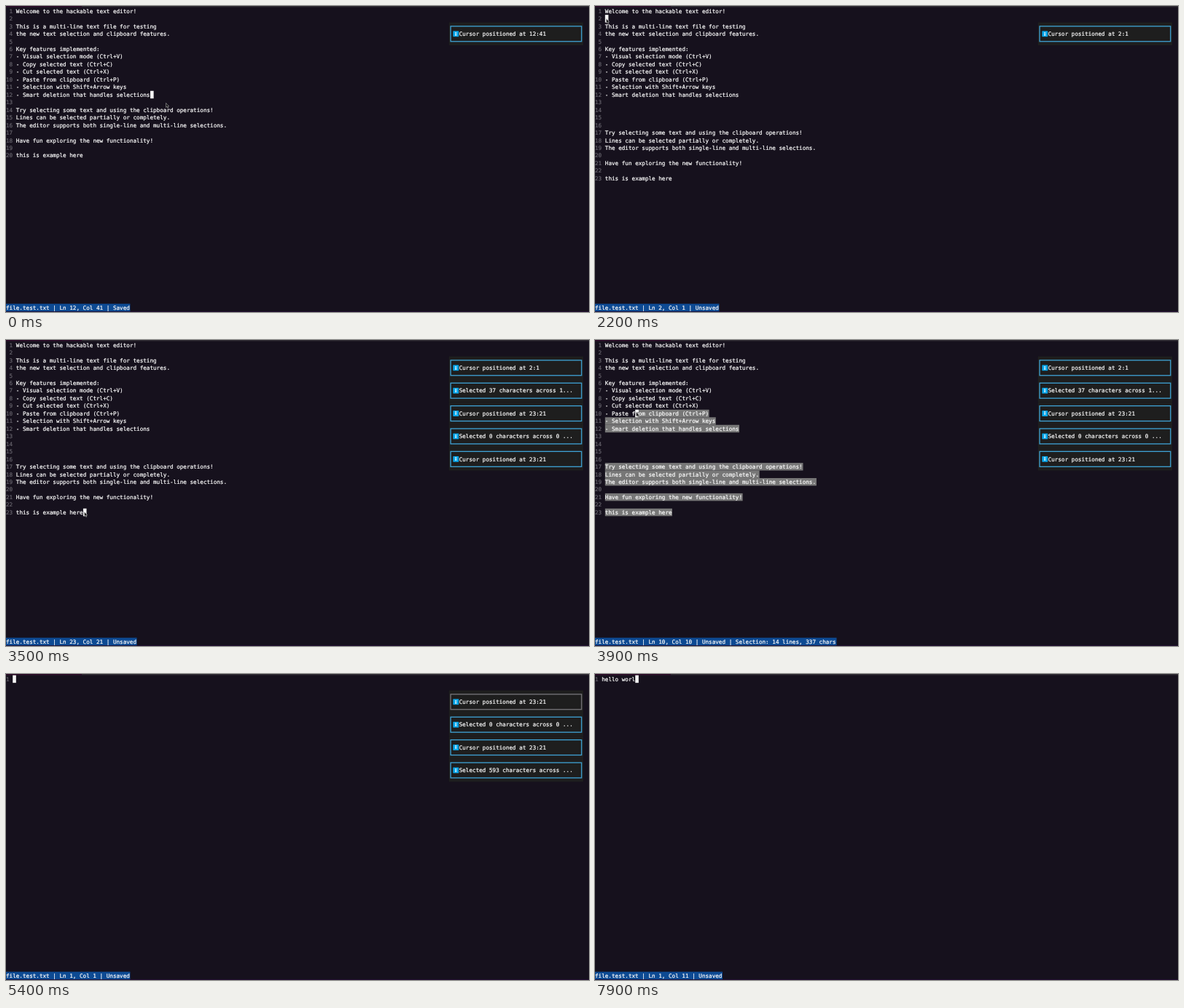
Recreate the animation shown at these times as an HTML page. Size 800 px wide and 421 px high, loop 8 s.

```html
<!DOCTYPE html>
<html lang="en">
<head>
<meta charset="utf-8">
<title>Text editor</title>
<style>
  html, body { margin: 0; width: 100%; height: 100%; overflow: hidden; background: #16111d; }
  svg { display: block; }
  text {
    font: 7.649px "DejaVu Sans Mono", monospace; white-space: pre;
    text-rendering: geometricPrecision; font-variant-ligatures: none;
    fill: #fafafa; stroke: #fafafa; stroke-width: .22px;
  }
  text.num { fill: #64616a; stroke: #64616a; }
  text.under { fill: #16111d; stroke: #16111d; }
  text.icon { font: bold 6.5px "DejaVu Sans", sans-serif; text-anchor: middle; }
  .sel { fill: #777; }
  .cur { fill: #f6f6f6; }
  .bar { fill: #0d4a93; }
  .box { fill: #1e1e1e; }
  .badge { fill: #0aa8ec; }
  .frame { fill: none; stroke: #3fa3d6; stroke-width: 1.3px; }
  .frame.old { stroke: #77757a; }
</style>
</head>
<body>
<svg width="800" height="421" viewBox="0 0 800 421">
  <rect width="800" height="421" fill="#16111d"/>
  <rect width="800" height="1.5" fill="#302d34"/>
  <rect width="104" height="1.5" fill="#2b0826"/>
  <rect y="420" width="800" height="1" fill="#231033"/>
  <g id="scene"></g>
  <path id="pointer" d="M.5 .5V6.4L1.8 5.2L2.8 7.5L3.8 7.1L2.8 4.9H4.6Z" fill="#111" stroke="#c4c4c4" stroke-width=".5"/>
</svg>
<script>
const LOOP = 8000, STEP = 100, CW = 4.605, RH = 10.46, TOP = 1.7, BASE = 8;
const FILE = `Welcome to the hackable text editor!

This is a multi-line text file for testing
the new text selection and clipboard features.

Key features implemented:
- Visual selection mode (Ctrl+V)
- Copy selected text (Ctrl+C)
- Cut selected text (Ctrl+X)
- Paste from clipboard (Ctrl+P)
- Selection with Shift+Arrow keys
- Smart deletion that handles selections

Try selecting some text and using the clipboard operations!
Lines can be selected partially or completely.
The editor supports both single-line and multi-line selections.

Have fun exploring the new functionality!

this is example here`.split("\n");

const ENTERS = [600, 800, 1000];
const DELETE = 5000;
const TYPED = "hello worl";
const KEYS = [6800, 6900, 7000, 7100, 7200, 7300, 7500, 7600, 7700, 7900];

// mouse drags: press and release time
const DRAGS = [[2200, 2500], [3000, 4400]];
// pointer path: time, x, y
const PATH = [[0, 219, 133], [1700, 219, 133], [2100, 15, 17], [2200, 15, 17], [2400, 15, 6],
  [2600, 15, 6], [2900, 121, 244], [3000, 107, 236], [3500, 107, 236], [3900, 56.5, 99], [4300, 15, 6]];
const POINTER_SHOWN = [[0, 600], [1700, 4500]];

const LIFE = 2500;
const TOASTS = [
  [-600, "Cursor positioned at 12:41"],
  [2200, "Cursor positioned at 2:1"],
  [2600, "Selected 37 characters across 1..."],
  [3000, "Cursor positioned at 23:21"],
  [3300, "Selected 0 characters across 0 ..."],
  [3500, "Cursor positioned at 23:21"],
  [4500, "Selected 593 characters across ..."]
];

const scene = document.getElementById("scene");
const pointer = document.getElementById("pointer");
const past = (times, t) => times.filter(x => x <= t).length;

function add(tag, cls, attrs, text = "") {
  const e = document.createElementNS("http://www.w3.org/2000/svg", tag);
  if (cls) e.setAttribute("class", cls);
  for (const k in attrs) e.setAttribute(k, attrs[k]);
  e.textContent = text;
  scene.append(e);
}

// drawing on the character grid
const fill = (cls, col, row, w, h = 1) =>
  add("rect", cls, { x: col * CW, y: TOP + row * RH, width: w * CW, height: h * RH });
const write = (cls, col, row, text) =>
  add("text", cls, { x: col * CW, y: TOP + row * RH + BASE }, text);

function pointerAt(t) {
  const i = PATH.findIndex(p => p[0] > t);
  if (i < 0) return PATH[PATH.length - 1].slice(1);
  const [t0, x0, y0] = PATH[i - 1], [t1, x1, y1] = PATH[i];
  const k = (t - t0) / (t1 - t0);
  return [x0 + (x1 - x0) * k, y0 + (y1 - y0) * k];
}

// zero-based line and column under the pointer
function cellAt(t, lines) {
  const [x, y] = pointerAt(t);
  const ln = Math.max(0, Math.min(lines.length - 1, Math.floor((y - TOP) / RH)));
  const col = Math.floor(x / CW) - 3;
  return [ln, Math.max(0, Math.min(lines[ln].length, col))];
}

function editorAt(t) {
  if (t >= DELETE) {
    const n = past(KEYS, t);
    return { lines: [TYPED.slice(0, n)], cur: [0, n], acted: n ? KEYS[n - 1] : DELETE };
  }
  const n = past(ENTERS, t);
  const lines = [...FILE.slice(0, 12), ...Array(n).fill(""), ...FILE.slice(12)];
  const drag = DRAGS.filter(d => d[0] <= t).pop();
  if (!drag) return { lines, cur: n ? [11 + n, 0] : [11, 40], acted: n ? ENTERS[n - 1] : 0 };
  return { lines, cur: cellAt(Math.min(t, drag[1]), lines), anchor: cellAt(drag[0], lines), acted: t };
}

function selection({ lines, cur, anchor }) {
  if (!anchor) return null;
  const [a, b] = [cur, anchor].sort((p, q) => p[0] - q[0] || p[1] - q[1]);
  const offset = ([ln, col]) => lines.slice(0, ln).reduce((s, l) => s + l.length + 1, col);
  const chars = offset(b) - offset(a);
  return chars ? { a, b, chars, count: b[0] - a[0] + 1 } : null;
}

function drawLine(text, i, digits, sel) {
  if (sel && i >= sel.a[0] && i <= sel.b[0]) {
    const from = i === sel.a[0] ? sel.a[1] : 0;
    const to = i === sel.b[0] ? sel.b[1] : text.length;
    fill("sel", digits + 1 + from, i, to - from);
  }
  write("num", 0, i, String(i + 1).padStart(digits));
  write("", digits + 1, i, text);
}

function drawCursor([ln, col], lines, digits) {
  fill("cur", digits + 1 + col, ln, 1);
  write("under", digits + 1 + col, ln, lines[ln][col] || "");
}

function drawToast([start, text], i, t) {
  const row = 2 + 3 * i, x = 132 * CW, y = TOP + row * RH;
  fill("box", 132, row, 40, 3);
  add("rect", start + LIFE - t <= STEP ? "frame old" : "frame",
    { x: x + CW / 2, y: y + RH / 2, width: 39 * CW, height: 2 * RH });
  add("rect", "badge", { x: x + 5.6, y: y + 11.8, width: 7.8, height: 7.8 });
  add("text", "icon", { x: x + 9.5, y: y + 18 }, "i");
  write("", 135, row + 1, text);
}

function draw(t) {
  scene.replaceChildren();
  const ed = editorAt(t), sel = selection(ed);
  const { lines, cur } = ed;
  const digits = String(lines.length).length;
  lines.forEach((l, i) => drawLine(l, i, digits, sel));
  if (Math.floor((t - ed.acted) / 500) % 2 === 0) drawCursor(cur, lines, digits);

  const parts = ["file.test.txt", `Ln ${cur[0] + 1}, Col ${cur[1] + 1}`, t < ENTERS[0] ? "Saved" : "Unsaved"];
  if (sel) parts.push(`Selection: ${sel.count} lines, ${sel.chars} chars`);
  const status = parts.join(" | ");
  fill("bar", 0, 39, status.length);
  write("", 0, 39, status);

  TOASTS.filter(([s]) => t >= s && t < s + LIFE).forEach((n, i) => drawToast(n, i, t));

  const [x, y] = pointerAt(t);
  pointer.setAttribute("transform", `translate(${x} ${y})`);
  pointer.style.display = POINTER_SHOWN.some(([a, b]) => t >= a && t < b) ? "" : "none";
}

let shown = -1;
function tick() {
  const t = Math.floor(performance.now() % LOOP / STEP) * STEP;
  if (t !== shown) draw(shown = t);
  requestAnimationFrame(tick);
}
tick();
</script>
</body>
</html>
```
